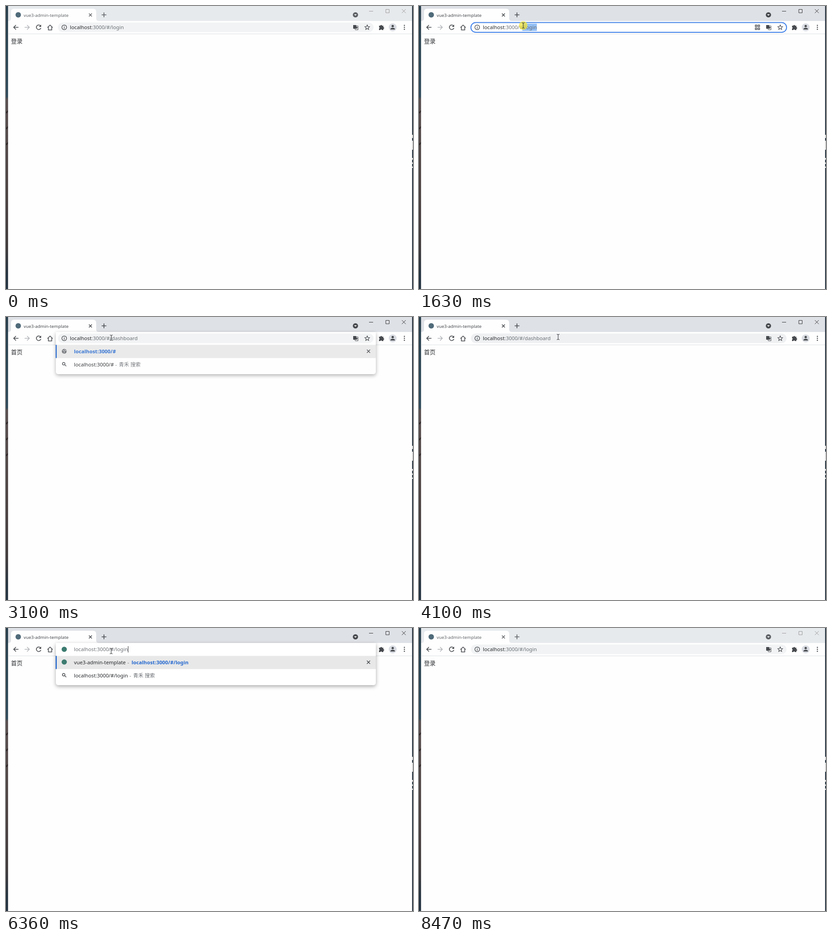
Animation of 898x624 px, one loop 8.55 s. Source, as an HTML page:

```html
<!DOCTYPE html>
<html lang="zh">
<head>
<meta charset="utf-8">
<style>
html, body { margin: 0; width: 100%; height: 100%; overflow: hidden; background: #fefefe }
svg { display: block; width: 898px; height: 624px }
text { font: 11.3px "Noto Sans", "Noto Sans CJK SC", sans-serif; white-space: pre }
.line { fill: none; stroke: #46494d; stroke-width: 1.6 }
.ink { fill: #46494d }
.dim { fill: #6b6f74 }
.dark { fill: #26282b }
.blue { fill: #2468cf }
.bold { font-weight: 700 }
.page { font: 12.7px "Noto Sans CJK SC", "Noto Sans CJK", sans-serif; fill: #2c2e31 }
.panel { filter: drop-shadow(0 3px 4px #0005) }
</style>
</head>
<body>
<svg viewBox="0 0 898 624">
  <defs>
    <linearGradient id="wall" x2="0" y2="1">
      <stop offset="0" stop-color="#243b49"/><stop offset=".32" stop-color="#2c4858"/>
      <stop offset=".33" stop-color="#574b4c"/><stop offset=".63" stop-color="#4a3f3f"/>
      <stop offset=".85" stop-color="#3c3637"/><stop offset=".95" stop-color="#20303d"/>
    </linearGradient>
  </defs>
  <rect width="5" height="624" fill="url(#wall)"/>
  <path d="M0 236l5-5M0 271l5-5M0 306l5-5" stroke="#2b2425" stroke-width="3"/>
  <rect x="896" width="2" height="624" fill="#22313e"/>
  <path d="M897 284v7m0 6v20m0 18v4m0 6v3m0 6v3" stroke="#d5d5d5" stroke-width="2"/>
  <rect id="strip" x="4.5" width="891.5" height="33"/>
  <rect x="4.5" y="33" width="891.5" height="591" fill="#fefefe"/>
  <path d="M4.5 61.5H896" stroke="#dcdfe2"/>
  <path d="M5 33q6 0 6-6V13q0-7 7-7h174q7 0 7 7v14q0 6 6 6z" fill="#fefefe"/>
  <circle cx="27" cy="19.5" r="6" fill="#4f6a79"/>
  <g id="tab">
    <text x="39" y="23.5" style="font-size:9.8px" class="ink">vue3-admin-template</text>
    <path class="line" d="M183 16.5l6.5 6.5m0-6.5l-6.5 6.5M211 19.5h10.5M216.2 14.300v10.5"/>
    <circle class="ink" cx="771" cy="19.5" r="5.8"/>
    <path d="M768 18.200h6l-3 3.300z" fill="#fff"/>
  </g>
  <path id="controls" fill="none" d="M801 11.500h9M838 7.500h7.500v7.500h-7.500zM873.500 7l8.500 8.500m0-8.500l-8.500 8.500"/>
  <path class="line" d="M27.500 47H17m5-5l-5 5 5 5M76 43.500a5.100 5.100 0 1 0 1 5M91.500 47.500l5.700-5.500 5.700 5.500M93.500 46.500v6.300h7.400v-6.300"/>
  <path class="line" style="stroke:#b4b7bb" d="M41 47h10.500m-5-5l5 5-5 5"/>
  <path class="ink" d="M77.500 41v5h-5z"/>
  <path class="ink" d="M823 43.500h3a1.800 1.800 0 0 1 3.600 0h3v3.300a1.800 1.800 0 0 1 0 3.600v2.600h-3.300a1.600 1.600 0 0 0-3.200 0H823v-3.200a1.700 1.700 0 0 0 0-3.300z"/>
  <circle cx="853.200" cy="47" r="8.700" fill="#dadde3"/>
  <circle class="ink" cx="853.200" cy="44.300" r="2.500"/>
  <path class="ink" d="M848.200 51.800v-1q1-2.800 5-2.800t5 2.800v1z"/>
  <g class="ink"><circle cx="879" cy="42.700" r="1.300"/><circle cx="879" cy="47" r="1.300"/><circle cx="879" cy="51.300" r="1.300"/></g>
  <g id="live"></g>
</svg>
<script>
const LOOP = 8550, STEP = 77;
const $ = id => document.getElementById(id);
const within = (t, a, b) => t >= a && t < b;

// Pointer path: time, x, y
const path = [
  [70, 330, 455], [770, 262, 16], [920, 262, 45], [1010, 262, 45], [1380, 230, 43], [1630, 230, 43],
  [1770, 233, 45], [3630, 232, 46], [3690, 297, 19], [3940, 297, 19], [4080, 307, 44], [4110, 307, 44],
  [4400, 291, 46], [4790, 239, 50], [4850, 232, 51], [7450, 232, 51], [7930, 340, 595]
];
// Typing: time, letters typed, caret x
const typing = [[5670, 1, 245], [5900, 2, 252], [6060, 3, 259], [6130, 4, 262], [6360, 5, 269.5]];

function pointerAt(time) {
  const t = Math.floor(time / STEP) * STEP;
  const i = path.findIndex(k => k[0] > t);
  if (i < 0) return path.at(-1).slice(1);
  if (!i) return path[0].slice(1);
  const [t0, x0, y0] = path[i - 1], [t1, x1, y1] = path[i];
  const f = (t - t0) / (t1 - t0);
  return [x0 + (x1 - x0) * f, y0 + (y1 - y0) * f];
}

const text = (x, y, cls, str) => `<text x="${x}" y="${y}" class="${cls}">${str}</text>`;
const box = (x, y, w, h, fill, more = '') => `<rect x="${x}" y="${y}" width="${w}" height="${h}" fill="${fill}" ${more}/>`;
const line = (d, w = 1.2) => `<path class="line" style="stroke-width:${w}" d="${d}"/>`;
const logo = y => `<circle cx="128.500" cy="${y}" r="5.800" fill="#3c7b70"/>`;
const globe = y => `<circle class="dim" cx="128.500" cy="${y}" r="5.300"/>
  <path d="M125 ${y - 2}l3 1 1 3-2 2M129 ${y - 4}l1 2 3 1" fill="none" stroke="#fff"/>`;
const info = line('M123.300 47a5.200 5.200 0 1 0 10.400 0a5.200 5.200 0 1 0-10.400 0M128.500 46.200v3.800M128.500 43.800v1.400', 1.3);
const star = line('M797 41.800l1.500 3.500 3.800.3-2.900 2.500.9 3.700-3.300-2-3.300 2 .9-3.700-2.900-2.500 3.800-.3z');
const pages = '<path class="ink" d="M766 42h6.500l2 8H766z"/>' + line('M773 44h3.700v8.500h-6l-1-2.500M773 47.500h3M774.500 46v3', 1);
const grid = line('M742 42h3.500v3.500h-3.500zM748 42h3.500v3.500h-3.500zM742 48.500h3.500v3.500h-3.500zM748 48.500h3.500v3.500h-3.500z', 1.4);

const pageRow = (y, url) => logo(y - 5) + text(150, y, 'dark', 'vue3-admin-template') +
  text(268, y, 'dim', '-') + text(277, y, 'blue', url);
const searchRow = (y, query, end) => line(`M124.500 ${y - 6}a2.800 2.800 0 1 0 5.600 0a2.800 2.800 0 1 0-5.600 0M129.500 ${y - 4}l3.500 3.500`, 1.4) +
  text(150, y, 'dark', query) + text(end + 4, y, 'dim', '-') + text(end + 12, y, 'dim', '青禾 搜索');

function panel(t, key) {
  const more = within(t, 2550, 2720), fading = within(t, 3100, 3180) || t >= 6840;
  const height = more ? 151 : 93, host = 'localhost:3000/#';
  let out = `<g opacity="${fading ? .9 : 1}"><path class="panel" fill="#fff" d="M110 33h706v${height - 6}q0 6-6 6H116q-6 0-6-6z"/>` +
    box(110, 61.500, 706, 29, '#e8e8e8') + box(109.500, 61.500, 2.500, 29, '#2468cf') +
    line('M796.300 72l7 7m0-7l-7 7', 1.5);
  if (key) {
    const word = 'login', n = key[1], typed = word.slice(0, n);
    out += pageRow(80, `<tspan class="bold">${host}/${typed}</tspan>${word.slice(n)}`) +
      searchRow(109, `${host}/${typed}`, key[2] - 1);
  } else {
    out += globe(75.500) + text(150, 80, 'blue bold', host) + searchRow(109, host, 237);
    if (more) out += pageRow(138, `<tspan class="bold">${host}</tspan>/login`) +
      pageRow(167, `<tspan class="bold">${host}</tspan>/dashboard`);
  }
  return out + '</g>';
}

function addressBar(t, x, y) {
  const route = within(t, 3100, 6840) ? 'dashboard' : 'login';
  const first = within(t, 1010, 2550), second = within(t, 4400, 5670);
  const focused = first || second;
  const hover = within(t, 70, 8010) && y > 35 && y < 59 && !within(t, 3100, 3180);
  let out = focused
    ? box(114.500, 36.500, 696.500, 21.500, '#fff', 'rx="10.750" stroke="#3f80e8" stroke-width="2"') + grid
    : box(114.500, 36.500, 696.500, 21, hover ? '#eef0f2' : '#f1f3f4', 'rx="10.500"');
  if (focused) {
    const left = first ? Math.max(228, x - 2) : x, right = first ? 260 : 290;
    if (left < right) out += box(left, 39, right - left, 16, '#93bff5');
  }
  return out + info + pages + star +
    text(141, 51, 'dim', `<tspan class="dark">localhost</tspan>:3000/#/${route}`);
}

function editBar(key) {
  if (!key) return globe(47) + text(150, 51, 'dim', 'localhost:3000/#') + box(238, 40, 1, 14, '#333');
  const caret = key[2];
  return logo(47) + (caret < 269 ? box(caret, 39, 269 - caret, 16, '#93bff5') : '') +
    text(150, 51, 'dim', 'localhost:3000/#/login') + box(caret - .5, 40, 1, 14, '#333');
}

function pointer(t, x, y) {
  if (!within(t, 70, 8010)) return '';
  const pressed = within(t, 1010, 2090) || within(t, 4400, 5220);
  const halo = pressed ? `<circle cx="${x}" cy="${y}" r="9.500" fill="#f0e43c" opacity="${t >= 5140 ? .35 : .75}"/>` : '';
  return halo + (y > 35 && y < 59
    ? `<path transform="translate(${x} ${y})" d="M-3-6q3 0 3 1.500q0-1.500 3-1.500M0-5V5M-3 6q3 0 3-1.500q0 1.500 3 1.500" fill="none" stroke="#25272a"/>`
    : `<path transform="translate(${x} ${y})" d="M0 0v14l3.200-3 2.300 5 2-1-2.200-4.700H10z" fill="#fff" stroke="#222" stroke-width=".8"/>`);
}

let shown;
function draw(now) {
  const t = now % LOOP;
  const active = within(t, 1010, 8470);
  const [x, y] = pointerAt(t);
  const key = typing.findLast(k => t >= k[0]);
  const open = within(t, 2550, 3180) || within(t, 5670, 6930);
  const editing = within(t, 2550, 3100) || within(t, 5670, 6840);
  const markup = text(11, 81.500, 'page', within(t, 3100, 6840) ? '首页' : '登录') +
    (open ? panel(t, key) : '') + (editing ? editBar(key) : addressBar(t, x, y)) + pointer(t, x, y);
  if (markup !== shown) $('live').innerHTML = shown = markup;
  $('strip').setAttribute('fill', active ? '#dee1e6' : '#e7eaed');
  $('tab').setAttribute('opacity', active ? 1 : .85);
  $('controls').setAttribute('stroke', active ? '#333' : '#999');
  requestAnimationFrame(draw);
}
requestAnimationFrame(draw);
</script>
</body>
</html>
```
